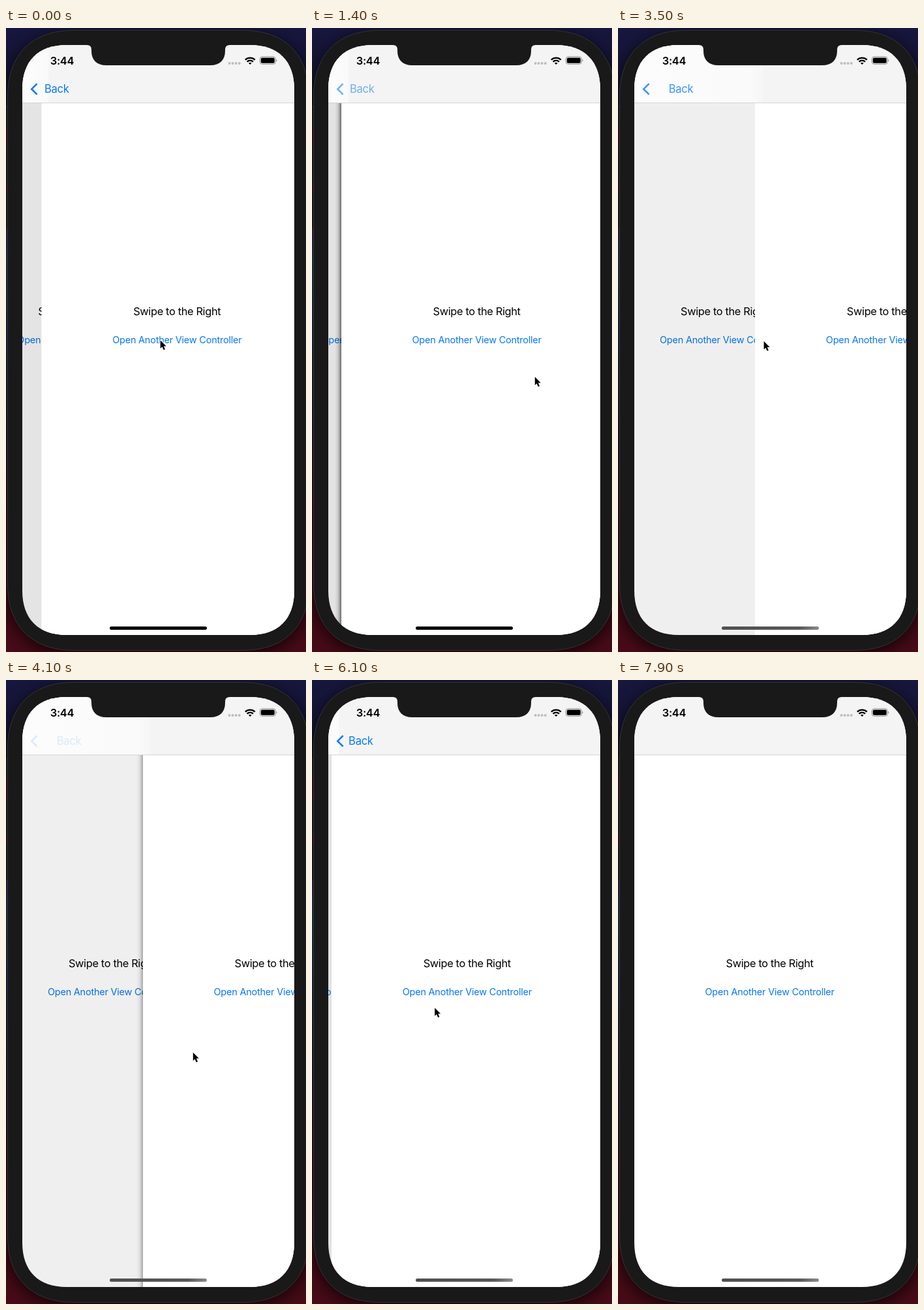
Recreate the animation shown at these times as an HTML page. Size 460 by 954 pixels, loop 8 s.

```html
<!DOCTYPE html>
<html lang="en">
<head>
<meta charset="utf-8">
<title>Swipe to go back</title>
<style>
html, body { margin: 0; width: 100%; height: 100%; overflow: hidden; background: #14143a; }
svg { display: block; width: 460px; height: 954px; }
text { font-family: Inter, "Liberation Sans", sans-serif; }
.label { font-size: 16.4px; letter-spacing: -.36px; }
.link { font-size: 14.5px; letter-spacing: -.23px; fill: #0877f2; }
.clock { font-size: 16.5px; font-weight: 600; letter-spacing: -.3px; }
.back { font-size: 16.6px; letter-spacing: -.3px; fill: #0a7af2; }
#body { filter: drop-shadow(0 6px 13px rgba(0, 0, 0, .75)); }
</style>
</head>
<body>
<svg viewBox="0 0 460 954">
  <defs>
    <linearGradient id="desk" x2="0" y2="1">
      <stop offset="0" stop-color="#17173f"/>
      <stop offset=".12" stop-color="#14122e"/>
      <stop offset=".16" stop-color="#47101c"/>
      <stop offset=".27" stop-color="#4a1020"/>
      <stop offset=".33" stop-color="#3c2262"/>
      <stop offset=".37" stop-color="#1d4460"/>
      <stop offset=".5" stop-color="#1c2a52"/>
      <stop offset=".66" stop-color="#241433"/>
      <stop offset=".78" stop-color="#3c0c16"/>
      <stop offset="1" stop-color="#480b17"/>
    </linearGradient>
    <linearGradient id="shade">
      <stop offset="0" stop-color="#000" stop-opacity="0"/>
      <stop offset=".5" stop-color="#000" stop-opacity=".12"/>
      <stop offset="1" stop-color="#000" stop-opacity=".55"/>
    </linearGradient>
    <linearGradient id="glow">
      <stop offset="0" stop-color="#fcfcfc"/>
      <stop offset=".9" stop-color="#fafafa"/>
      <stop offset="1" stop-color="#f6f6f6"/>
    </linearGradient>
    <linearGradient id="grip">
      <stop offset="0" stop-color="#505050"/>
      <stop offset=".8" stop-color="#585858"/>
      <stop offset="1" stop-color="#8c8c8c"/>
    </linearGradient>
    <clipPath id="screen"><path id="glass"/></clipPath>
    <clipPath id="left"><rect id="leftBox" x="25" y="114" height="814"/></clipPath>
    <g id="words">
      <text class="label" x="165.5" y="439">Swipe to the Right</text>
      <text class="link" x="133.5" y="482.3">Open Another View Controller</text>
    </g>
  </defs>

  <rect width="460" height="954" fill="url(#desk)"/>
  <g fill="#202022" stroke="#4a3438" stroke-width=".7">
    <rect x="-2" y="119.5" width="8" height="33"/>
    <rect x="-2" y="181.5" width="8" height="57"/>
    <rect x="-2" y="248.5" width="8" height="58"/>
  </g>
  <path id="body" fill="#191919" stroke="#343436"/>

  <g clip-path="url(#screen)">
    <rect x="25" y="26" width="417" height="902" fill="#fff"/>
    <g clip-path="url(#left)">
      <use id="under" href="#words"/>
      <rect id="dim" x="25" y="114" width="417" height="814"/>
    </g>
    <g id="over">
      <rect id="shadow" x="15" y="114" width="10" height="814" fill="url(#shade)"/>
      <rect x="25" y="114" width="417" height="814" fill="#fff"/>
      <use href="#words"/>
    </g>
    <rect x="25" y="26" width="417" height="88" fill="#f4f4f4"/>
    <rect id="light" x="25" y="26" height="88" fill="url(#glow)"/>
    <rect x="25" y="114" width="417" height="1" fill="#d4d4d4"/>
    <g id="nav">
      <path d="M47.6 85.2L39.3 93.4L47.6 101.6" fill="none" stroke="#0a7af2" stroke-width="2.6"/>
      <text id="back" class="back" y="99.3">Back</text>
    </g>
    <text class="clock" x="67.7" y="55.8">3:44</text>
    <g fill="#bdbdbd">
      <circle cx="342.6" cy="54" r="2"/><circle cx="347.6" cy="54" r="2"/>
      <circle cx="352.7" cy="54" r="2"/><circle cx="357.8" cy="54" r="2"/>
    </g>
    <g fill="none" stroke="#000" stroke-width="2.3">
      <path d="M366.8 48.6a10.8 10.8 0 0 1 15 0M369.6 51.6a6.8 6.8 0 0 1 9.4 0"/>
      <path d="M374.3 52.8L371.9 53.6L374.3 56L376.7 53.6Z" fill="#000" stroke="none"/>
    </g>
    <rect x="389.3" y="43.9" width="24" height="11.4" rx="3.4" fill="none" stroke="#8d8d8d"/>
    <rect x="390.8" y="45.4" width="21" height="8.4" rx="2"/>
    <path d="M414.4 47.8a2.2 2.2 0 0 1 0 3.8z" fill="#8d8d8d"/>
    <rect id="home" x="159" y="915" width="149" height="5" rx="2.5"/>
  </g>
  <path d="M124 25H343V26Q336 26 336 33V35C336 49 328 57 313 57H154C139 57 131 49 131 35V33Q131 26 124 26Z" fill="#191919"/>
  <path id="cursor" d="M0 0V12.6L2.8 9.9L5 14.9L7.2 13.9L5.1 9.1H9Z" stroke="#fff" stroke-width="1.6" paint-order="stroke" stroke-linejoin="round"/>
</svg>
<script>
const LOOP = 8000, STEP = 100, WIDTH = 417;
const PUSH = 450, SETTLE = 350, CLICK = { x: 230, y: 472 };
const $ = id => document.getElementById(id);

// Each round: tap the link, drag right from (x, y) by reach, let go
const rounds = [
  { push: -330, drag: 1300, stop: 1600, drop: 1600, x: 321, y: 532, reach: 60 },
  { push: 2000, drag: 2450, stop: 2650, drop: 2650, x: 154, y: 550, reach: 200 },
  { push: 3350, drag: 3850, stop: 4150, drop: 4710, x: 101, y: 568, reach: 222 },
  { push: 5700, drag: 6700, stop: 7150, drop: 7150, x: 81, y: 569, reach: 389 }
];

const part = (t, a, b) => Math.max(0, Math.min(1, (t - a) / (b - a)));
const mix = (a, b, u) => a + (b - a) * u;
const out = u => 1 - (1 - u) ** 2;
const smooth = u => u * u * (3 - 2 * u);
const move = (id, x, y = 0) => $(id).setAttribute("transform", `translate(${x} ${y})`);
const set = (id, name, value) => $(id).setAttribute(name, value);

// Rounded box whose corners ease in over a length e
function box(x, y, w, h, e) {
  const k = e * .36, r = x + w, b = y + h;
  return `M${x} ${y + e}C${x} ${y + k} ${x + k} ${y} ${x + e} ${y}H${r - e}` +
    `C${r - k} ${y} ${r} ${y + k} ${r} ${y + e}V${b - e}` +
    `C${r} ${b - k} ${r - k} ${b} ${r - e} ${b}H${x + e}` +
    `C${x + k} ${b} ${x} ${b - k} ${x} ${b - e}Z`;
}

function offset(r, t) {
  if (t < r.drag) return WIDTH * (1 - out(part(t, r.push, r.push + PUSH)));
  const pulled = r.reach * part(t, r.drag, r.stop);
  return mix(pulled, WIDTH, out(part(t, r.drop, r.drop + SETTLE)));
}

function pointer(r, next, t) {
  const go = smooth(part(t, r.push + 100, r.drag - 50));
  const home = next ? smooth(part(t, r.drop, next.push - 50)) : 0;
  const x = mix(CLICK.x, r.x, go) + r.reach * part(t, r.drag, r.stop);
  return [mix(x, CLICK.x, home), mix(mix(CLICK.y, r.y, go), CLICK.y, home)];
}

function draw(t) {
  const i = rounds.findLastIndex(r => r.push <= t), r = rounds[i];
  const d = offset(r, t), p = d / WIDTH, popping = t > r.drag;
  move("over", d);
  move("under", -.3 * WIDTH * (1 - p));
  set("leftBox", "width", d);
  set("dim", "opacity", .115 * (1 - p));
  set("shadow", "opacity", popping ? 1 - p : 0);
  set("light", "width", d && d + 12);
  set("light", "opacity", Math.min(1, 2 * (1 - p)));
  set("nav", "opacity", popping ? .65 * (1 - p) ** 2.7 : 1 - p * p);
  set("back", "x", 55.5 + 50 * p);
  set("home", "fill", t < 2000 ? "#000" : "url(#grip)");
  const [x, y] = pointer(r, rounds[i + 1], t);
  move("cursor", x + .8, y + 1.5);
}

set("glass", "d", box(25, 26, 417, 902, 68));
set("body", "d", box(2.5, 3.5, 462, 948, 102));

const start = performance.now();
function tick() {
  const t = (performance.now() - start) % LOOP;
  draw(Math.floor(t / STEP) * STEP);
  requestAnimationFrame(tick);
}
tick();
</script>
</body>
</html>
```
